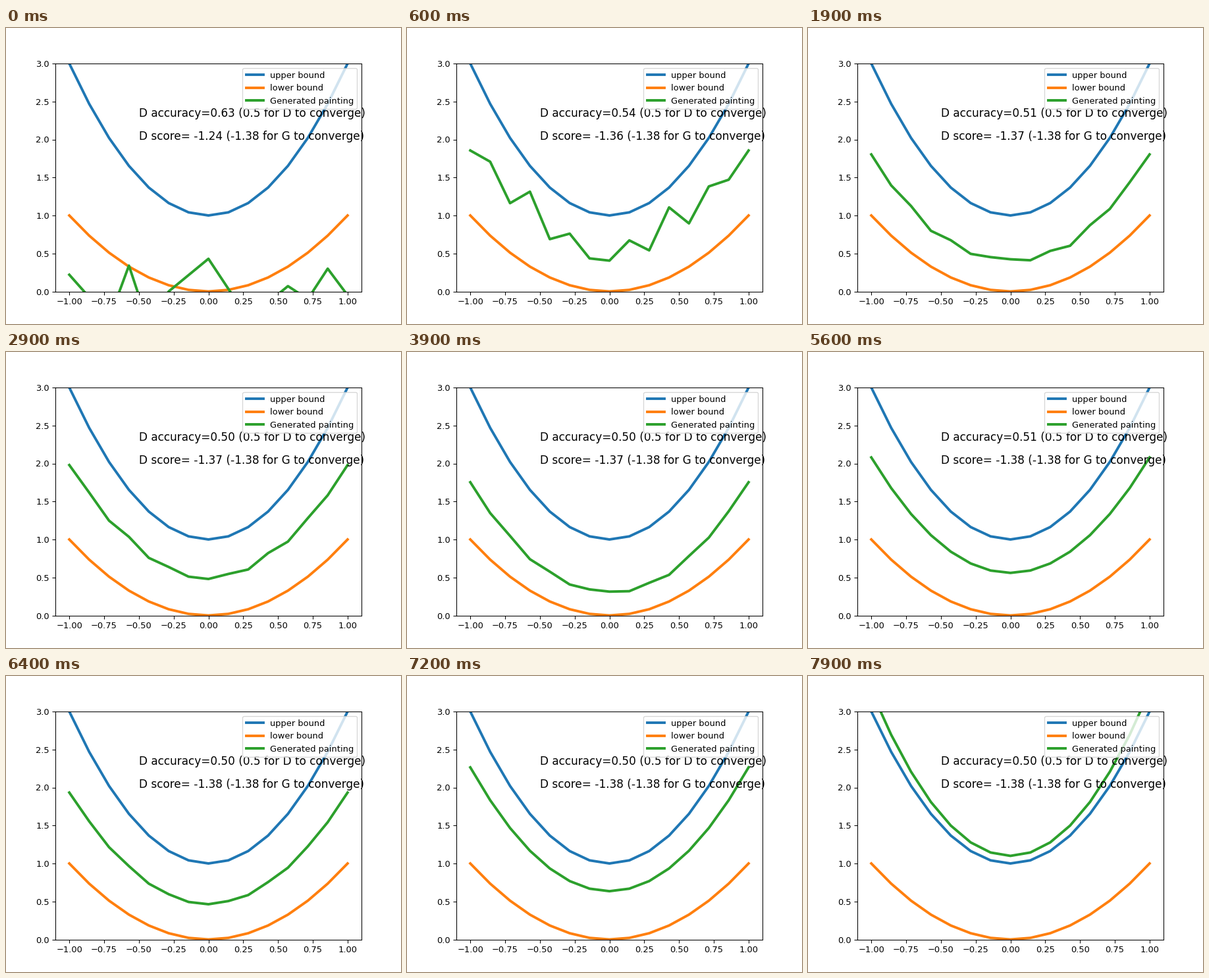
Recreate the animation shown at these times as a matplotlib script. Size 600x450 px, loop 8 s.

```python
import numpy as np
import matplotlib.pyplot as plt
from matplotlib.animation import FuncAnimation

FRAMES, STEP = 80, 100
x = np.linspace(-1, 1, 15)


def painting(a, c, ripple=0.0):
    """A parabola with a rippled outline; training flattens the ripple."""
    u = 2 * np.pi * (x - 3 / 7)
    return a * x**2 + c + ripple * (np.cos(3 * u) + 0.5 * np.cos(u))


# The untrained output is a few spikes around zero.
untrained = np.interp(
    7 * x,
    [-7, -5, -4, -3, -2, 0, 2, 4, 5, 6, 7],
    [0.22, -0.37, 0.34, -0.45, 0, 0.43, -0.36, 0.07, -0.1, 0.3, -0.05])

# start in ms, accuracy, score, painted curve
plots = [
    (0, 0.63, -1.24, untrained),
    (600, 0.54, -1.36, painting(1.45, 0.54, 0.2)),
    (1300, 0.52, -1.36, painting(1.45, 0.47, 0.08)),
    (1900, 0.51, -1.37, painting(1.38, 0.40, -0.035)),
    (2400, 0.50, -1.37, painting(1.50, 0.50, 0.03)),
    (3300, 0.51, -1.37, painting(1.85, 0.80, 0.02)),
    (3900, 0.50, -1.37, painting(1.44, 0.30, -0.02)),
    (4500, 0.51, -1.38, painting(2.00, 0.98, 0.01)),
    (5100, 0.51, -1.38, painting(1.52, 0.56)),
    (5900, 0.50, -1.38, painting(1.47, 0.47, 0.01)),
    (6500, 0.50, -1.38, painting(1.55, 0.55, -0.01)),
    (7200, 0.50, -1.38, painting(1.63, 0.635)),
    (7700, 0.50, -1.38, painting(2.17, 1.10)),
]

fig, ax = plt.subplots(figsize=(6.4, 4.8), dpi=93.75)
fig.subplots_adjust(left=0.125, right=0.9, bottom=0.11, top=0.88)
ax.plot(x, 2 * x**2 + 1, lw=3, color="tab:blue", label="upper bound")
ax.plot(x, x**2, lw=3, color="tab:orange", label="lower bound")
curve, = ax.plot(x, untrained, lw=3, color="tab:green",
                 label="Generated painting")
ax.set_xlim(-1.1, 1.1)
ax.set_ylim(0, 3)
accuracy = ax.text(-0.5, 2.3, "", size=13)
score = ax.text(-0.5, 2, "", size=13)
ax.legend(loc="upper right", fontsize=10)


def draw(frame):
    now = frame * STEP
    _, acc, value, heights = [p for p in plots if p[0] <= now][-1]
    curve.set_ydata(heights)
    accuracy.set_text(f"D accuracy={acc:.2f} (0.5 for D to converge)")
    score.set_text(f"D score= {value:.2f} (-1.38 for G to converge)")
    return curve, accuracy, score


anim = FuncAnimation(fig, draw, frames=FRAMES, interval=STEP,
                     init_func=lambda: draw(0), repeat=True, repeat_delay=0)
plt.show()
```
